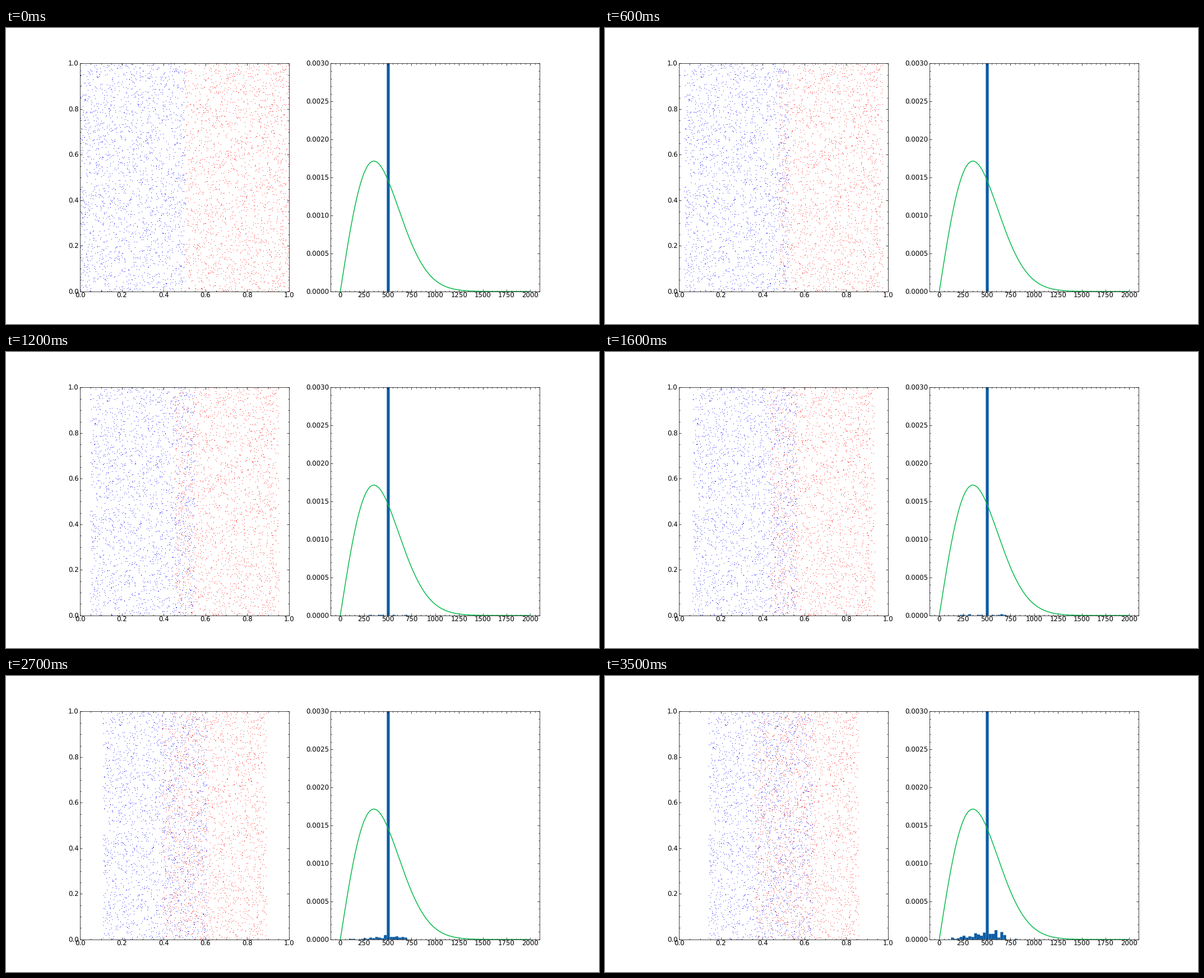
A matplotlib script that plays this animation: 1058 px wide and 529 px high, repeating every 3600 ms.

```python
import numpy as np
import matplotlib.pyplot as plt
from matplotlib.animation import FuncAnimation
from matplotlib.ticker import AutoMinorLocator, MultipleLocator

W, H, DPI = 1058, 529, 105.8
FRAMES, INTERVAL = 36, 100
N, SPEED, DT = 4000, 500.0, 8e-6
REACH = 0.0009         # centre distance at which two particles collide
DOT = 1.05             # dot diameter in pixels
BINS = np.linspace(0, 1500, 50)

plt.rcParams.update({
    "font.family": "DejaVu Sans", "font.size": 8, "text.hinting": "no_hinting",
    "axes.linewidth": 0.5, "lines.linewidth": 1.0,
    "xtick.direction": "in", "ytick.direction": "in",
    "xtick.top": True, "ytick.right": True,
    "xtick.major.size": 3, "ytick.major.size": 3,
    "xtick.minor.size": 1.5, "ytick.minor.size": 1.5,
    "xtick.major.width": 0.5, "ytick.major.width": 0.5,
    "xtick.minor.width": 0.5, "ytick.minor.width": 0.5,
    "xtick.major.pad": 1.5, "ytick.major.pad": 1.8,
})


def collide(pos, vel):
    """Elastic collisions between all pairs closer than REACH."""
    order = np.argsort(pos[:, 0])
    for k in range(1, 25):
        a, b = order[:-k], order[k:]
        gap = pos[a] - pos[b]
        dist2 = (gap ** 2).sum(axis=1)
        hit = dist2 < REACH ** 2
        a, b, gap = a[hit], b[hit], gap[hit]
        push = ((vel[a] - vel[b]) * gap).sum(axis=1) / dist2[hit]
        vel[a] -= push[:, None] * gap
        vel[b] += push[:, None] * gap


def simulate():
    """Positions and speed histogram for every frame."""
    rng = np.random.default_rng(4)
    pos = rng.random((N, 2))
    left = pos[:, 0] < 0.5
    vel = np.zeros((N, 2))
    vel[:, 0] = np.where(left, SPEED, -SPEED)
    states = []
    for _ in range(FRAMES):
        density, _ = np.histogram(np.hypot(*vel.T), BINS, density=True)
        states.append((pos, density))
        collide(pos, vel)
        vel = np.where(pos > 1, -abs(vel), np.where(pos < 0, abs(vel), vel))
        pos = pos + vel * DT
    return states, left


states, left = simulate()

fig, (box, hist) = plt.subplots(1, 2, figsize=(W / DPI, H / DPI), dpi=DPI)
fig.patch.set_facecolor("white")

dot = dict(s=(DOT * 72 / DPI) ** 2, linewidths=0)
red = box.scatter([], [], color="red", **dot)
blue = box.scatter([], [], color="blue", **dot)
box.set(xlim=(0, 1), ylim=(0, 1))

bars = hist.bar(BINS[:-1], states[0][1], width=np.diff(BINS), align="edge",
                color="#0C5DA5", snap=False)
v = np.linspace(0, 2000, 1000)
a = 2 / SPEED ** 2
hist.plot(v, a * v * np.exp(-a * v ** 2 / 2), color="#00B945")
hist.set(xlim=(-100, 2100), ylim=(0, 0.003))
hist.xaxis.set_major_locator(MultipleLocator(250))
hist.yaxis.set_major_locator(MultipleLocator(0.0005))

for ax, parts in ((box, 4), (hist, 5)):
    ax.xaxis.set_minor_locator(AutoMinorLocator(parts))
    ax.yaxis.set_minor_locator(AutoMinorLocator(parts))


def draw(i):
    pos, density = states[i]
    red.set_offsets(pos[~left])
    blue.set_offsets(pos[left])
    for bar, height in zip(bars, density):
        bar.set_height(height)
    return [red, blue, *bars]


anim = FuncAnimation(fig, draw, frames=FRAMES, interval=INTERVAL, repeat=True,
                     repeat_delay=0, blit=False)
plt.show()
```
